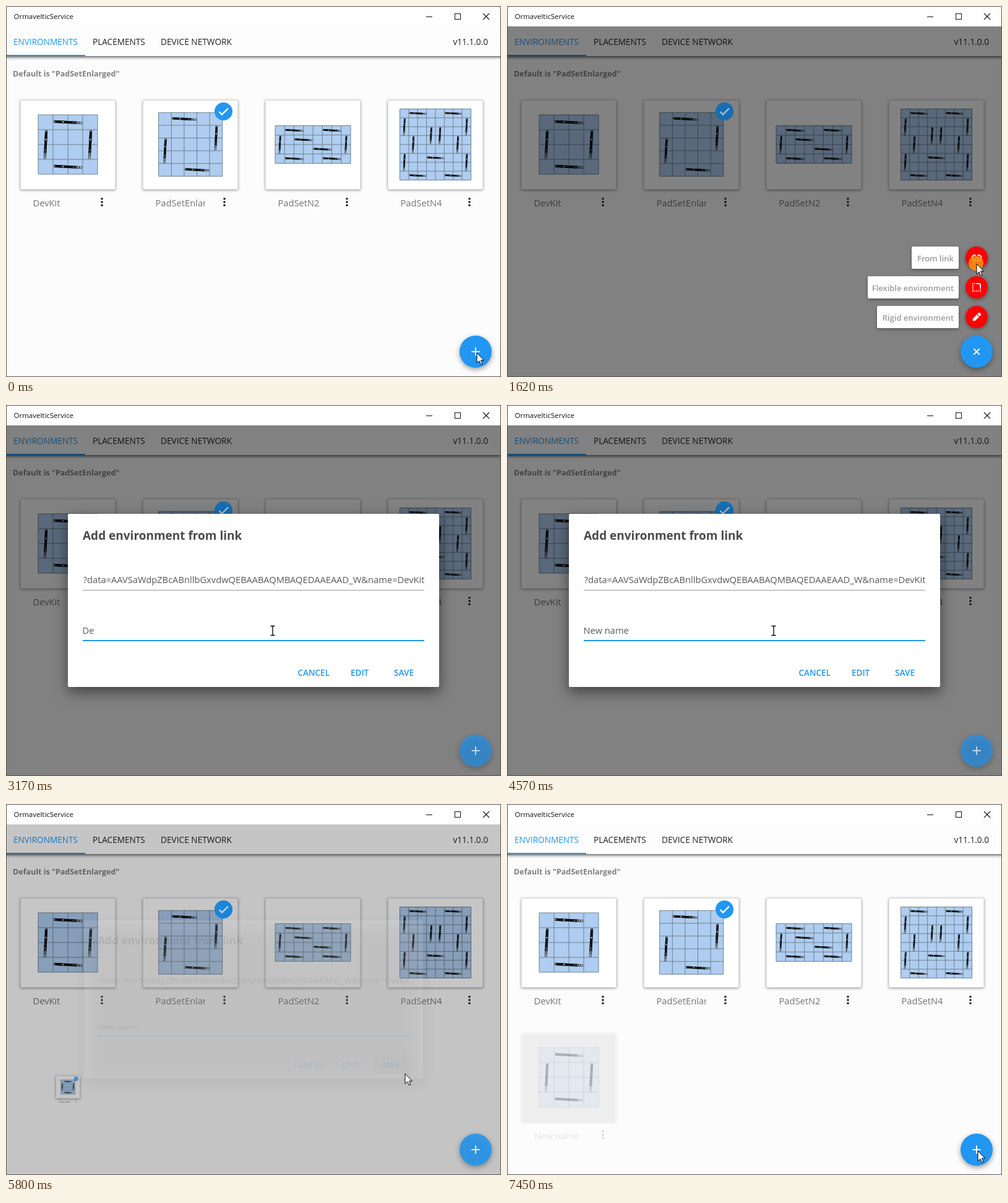
An HTML page with a canvas that plays this animation: 800x600 px, repeating every 7.52 s.

```html
<!DOCTYPE html>
<html lang="en">
<head>
<meta charset="utf-8">
<title>Environment manager</title>
<style>
  html, body { margin: 0; width: 100%; height: 100%; overflow: hidden; background: #fcfcfc; }
  canvas { display: block; width: 100vw; height: 100vh; }
</style>
</head>
<body>
<canvas id="stage" width="800" height="600"></canvas>
<script>
const ctx = document.getElementById('stage').getContext('2d');
const LOOP = 7520, TICK = 70, FONT = '"Open Sans", "Noto Sans", sans-serif';
const BLUE = '#2196f3';
let t = 0;

const clamp = v => Math.max(0, Math.min(1, v));
const during = (a, b) => t >= a && t < b;
const easeInOut = p => p < 0.5 ? 2 * p * p : 1 - 2 * (1 - p) * (1 - p);
const mix = (a, b, p) => a + (b - a) * p;

function ramp(a, b) {
  return t < a ? 0 : clamp((Math.floor((t - a) / TICK) + 1) * TICK / (b - a + TICK));
}

function group(alpha, cx, cy, scale, draw) {
  if (alpha <= 0 || scale <= 0) return;
  ctx.save();
  ctx.globalAlpha *= alpha;
  ctx.translate(cx, cy);
  ctx.scale(scale, scale);
  ctx.translate(-cx, -cy);
  draw();
  ctx.restore();
}

function text(str, x, y, size, color, weight = 400, align = 'left') {
  ctx.font = `${weight} ${size}px ${FONT}`;
  ctx.fillStyle = color;
  ctx.textAlign = align;
  ctx.fillText(str, x, y);
}

function box(x, y, w, h, color) {
  ctx.fillStyle = color;
  ctx.fillRect(x, y, w, h);
}

function disc(x, y, r, color) {
  ctx.fillStyle = color;
  ctx.beginPath();
  ctx.arc(x, y, r, 0, 7);
  ctx.fill();
}

function lines(points, width, color) {
  ctx.lineWidth = width;
  ctx.strokeStyle = color;
  ctx.beginPath();
  for (let i = 0; i < points.length; i += 4) {
    ctx.moveTo(points[i], points[i + 1]);
    ctx.lineTo(points[i + 2], points[i + 3]);
  }
  ctx.stroke();
}

function shadowed(blur, dy, alpha, draw) {
  ctx.save();
  ctx.shadowColor = `rgba(0,0,0,${alpha})`;
  ctx.shadowBlur = blur;
  ctx.shadowOffsetY = dy;
  draw();
  ctx.restore();
}

function panel(x, y, w, h, r) {
  ctx.fillStyle = '#fff';
  ctx.beginPath();
  ctx.roundRect(x, y, w, h, r);
  ctx.fill();
}

// Floor plans: flat and upright bars as column, row pairs of their centres.
const KIT = { x: 52, y: 176, cell: 24, cols: 4, rows: 4,
  flat: [2, .5, 2, 3.5], up: [.5, 2, 3.5, 2] };
const PLANS = [
  { name: 'DevKit', ...KIT },
  { name: 'PadSetEnlarged', x: 246.7, y: 172.3, cell: 20.6, cols: 5, rows: 5,
    flat: [2, .5, 3, 4.5], up: [4.5, 2, .5, 3] },
  { name: 'PadSetN2', x: 435, y: 193.5, cell: 15.25, cols: 8, rows: 4,
    flat: [2, .5, 6, .5, 3, 1.5, 5, 2.5, 2, 3.5, 6, 3.5], up: [.5, 2, 7.5, 2] },
  { name: 'PadSetN4', x: 636.5, y: 166.5, cell: 14.37, cols: 8, rows: 8,
    flat: [2, .5, 6, .5, 4, 5.5, 2, 7.5, 6, 7.5],
    up: [.5, 2, 7.5, 2, 3.5, 3, 4.5, 3, 1.5, 4, 6.5, 4, .5, 6, 7.5, 6] }
];

function bar(x, y, cell, upright) {
  const len = cell * 1.92, thick = Math.max(2.6, cell * 0.17);
  ctx.save();
  ctx.translate(x, y);
  ctx.rotate((upright ? 93 : 3) * Math.PI / 180);
  box(-len / 2, -thick / 2, len, thick, '#4a5057');
  box(-len * .47, -thick / 2, len * .78, thick, '#0d0f11');
  for (const p of [-.46, -.17, .2, .3, .37, .45])
    disc(len * p, 0, thick * (p === -.17 || p > .4 ? .27 : .19), '#e8eef4');
  ctx.restore();
}

function plan({ x, y, cell, cols, rows, flat, up }) {
  const w = cell * cols, h = cell * rows, grid = [];
  box(x, y, w, h, '#aecdf0');
  for (let c = 0; c <= cols; c++) grid.push(x + c * cell, y, x + c * cell, y + h);
  for (let r = 0; r <= rows; r++) grid.push(x, y + r * cell, x + w, y + r * cell);
  lines(grid, 1, '#71808f');
  for (let i = 0; i < flat.length; i += 2) bar(x + flat[i] * cell, y + flat[i + 1] * cell, cell, false);
  for (let i = 0; i < up.length; i += 2) bar(x + up[i] * cell, y + up[i + 1] * cell, cell, true);
}

function card(x, y, item, name) {
  shadowed(4, 1, .42, () => panel(x, y, 154, 145, 2));
  ctx.lineWidth = 1;
  ctx.strokeStyle = 'rgba(0,0,0,.12)';
  ctx.strokeRect(x + .5, y + .5, 153, 144);
  plan(item);
  ctx.save();
  ctx.beginPath();
  ctx.rect(x + 18, y + 150, 83, 36);
  ctx.clip();
  text(name, x + 20.5, y + 172, 14.7, '#757575');
  ctx.restore();
  for (const dy of [159.7, 165, 170.3]) disc(x + 132, y + dy, 1.8, '#212121');
}

function badge(x, y) {
  disc(x, y, 14.5, BLUE);
  ctx.lineWidth = 2.4;
  ctx.strokeStyle = '#fff';
  ctx.beginPath();
  ctx.moveTo(x - 7, y + .5);
  ctx.lineTo(x - 2.5, y + 5);
  ctx.lineTo(x + 7.5, y - 5);
  ctx.stroke();
}

function titleBar() {
  box(0, 0, 800, 33, '#fff');
  text('OrmavelticService', 12.5, 21, 11.5, '#111');
  box(679, 17, 10, 1, '#111');
  ctx.lineWidth = 1;
  ctx.strokeStyle = '#111';
  ctx.strokeRect(725.5, 12.5, 9, 9);
  lines([771, 12, 781, 22, 781, 12, 771, 22], 1.1, '#111');
}

function page() {
  box(0, 0, 800, 600, '#fcfcfc');
  shadowed(5, 1.5, .75, () => box(-10, 33, 820, 48, '#fdfdfd'));
  text('ENVIRONMENTS', 12, 63, 13.6, BLUE);
  text('PLACEMENTS', 140, 63, 13.6, '#212121');
  text('DEVICE NETWORK', 250, 63, 13.7, '#212121');
  text('v11.1.0.0', 779, 63, 13.6, '#212121', 400, 'right');
  box(1, 79, 127, 2, BLUE);
  text('Default is "PadSetEnlarged"', 11, 114, 12.5, '#808080', 700);
  PLANS.forEach((p, i) => card(23 + 198 * i, 152, p, p.name));
  badge(351.5, 170.5);

  const grow = [0, .25, .72, 1][Math.max(0, Math.min(3, Math.floor((t - 5730) / TICK)))];
  const shown = clamp((LOOP - t) / 420);
  group(shown, 100, 463, grow, () => {
    card(23, 370, { ...KIT, y: 394 }, 'New name');
    if (grow < 1) group(1 - grow, 0, 0, 1, () => badge(153, 388));
  });
}

function fab(turn) {
  shadowed(9, 3, .38, () => disc(759, 559, 26, BLUE));
  ctx.save();
  ctx.translate(759, 559);
  ctx.rotate(turn * Math.PI / 4);
  lines([-6.7, 0, 6.7, 0, 0, -6.7, 0, 6.7], 2, '#fff');
  ctx.restore();
}

function linkIcon() {
  ctx.lineWidth = 1.8;
  ctx.strokeStyle = '#fff';
  ctx.beginPath();
  ctx.moveTo(-1.5, -4);
  ctx.lineTo(-3.5, -4);
  ctx.arc(-3.5, 0, 4, -Math.PI / 2, Math.PI / 2, true);
  ctx.lineTo(-1.5, 4);
  ctx.moveTo(1.5, -4);
  ctx.lineTo(3.5, -4);
  ctx.arc(3.5, 0, 4, -Math.PI / 2, Math.PI / 2);
  ctx.lineTo(1.5, 4);
  ctx.moveTo(-3, 0);
  ctx.lineTo(3, 0);
  ctx.stroke();
}

function cornerIcon() {
  for (let i = 0; i < 5; i++) {
    const p = -7 + i * 3;
    box(-7, p, 1.7, 1.7, '#fff');
    box(p, 5.3, 1.7, 1.7, '#fff');
  }
  box(5.3, 2, 1.7, 1.7, '#fff');
  box(-4, -7, 1.7, 1.7, '#fff');
  ctx.lineWidth = 1.8;
  ctx.strokeStyle = '#fff';
  ctx.beginPath();
  ctx.moveTo(-1, -6.1);
  ctx.lineTo(3, -6.1);
  ctx.arc(3, -3, 3.1, -Math.PI / 2, 0);
  ctx.lineTo(6.1, 1);
  ctx.stroke();
}

function pencilIcon() {
  ctx.rotate(-Math.PI / 4);
  ctx.fillStyle = '#fff';
  ctx.beginPath();
  ctx.moveTo(-9, 0);
  ctx.lineTo(-6, -2.5);
  ctx.lineTo(3, -2.5);
  ctx.lineTo(3, 2.5);
  ctx.lineTo(-6, 2.5);
  ctx.fill();
  box(4.2, -2.5, 4, 5, '#fff');
}

const ACTIONS = [
  { y: 407, left: 654, label: 'From link', icon: linkIcon },
  { y: 455, left: 583, label: 'Flexible environment', icon: cornerIcon },
  { y: 503, left: 598, label: 'Rigid environment', icon: pencilIcon }
];

function menu() {
  ACTIONS.forEach(({ y, left, label, icon }, i) => {
    const start = 400 + (2 - i) * TICK, p = ramp(start, start + 140);
    group(p, 759, y, p, () => {
      shadowed(6, 2, .4, () => disc(759, y, 18, '#f00'));
      ctx.save();
      ctx.translate(759, y);
      icon();
      ctx.restore();
    });
    group(p, 730, y, mix(.8, 1, p), () => {
      shadowed(5, 2, .35, () => panel(left, y - 18, 730 - left, 36, 2));
      text(label, 722, y + 6, 13, '#9a9a9a', 600, 'right');
    });
  });
}

const EDITS = [
  [0, 'DevKit'], [2840, 'DevKi'], [2940, 'DevK'], [3040, 'Dev'], [3140, 'De'], [3240, ''],
  [3540, 'N'], [3770, 'Ne'], [3970, 'New'], [4170, 'New '], [4270, 'New n'],
  [4370, 'New na'], [4470, 'New nam'], [4570, 'New name']
];

function underline(y, focus) {
  box(124, y, 552, 1, '#9a9a9a');
  box(400 - 276 * focus, y - 1, 552 * focus, 2, BLUE);
}

function dialog() {
  shadowed(22, 8, .5, () => panel(100, 176, 600, 280, 2));
  text('Add environment from link', 124, 218, 19, '#4a4a4a', 700);
  ctx.save();
  ctx.beginPath();
  ctx.rect(124, 265, 553, 34);
  ctx.clip();
  text('?data=AAVSaWdpZBcABnllbGxvdwQEBAABAQMBAQEDAAEAAD_W&name=DevKit',
    676.5, 288, 14.7, '#5a5a5a', 400, 'right');
  ctx.restore();
  const swap = ramp(2440, 2640);
  underline(299, ramp(1890, 2100) * (1 - swap));
  underline(381, swap);
  text(EDITS.findLast(e => t >= e[0])[1], 123.5, 370, 14.7, '#5a5a5a');
  if (t >= 5320) box(613, 415, 62, 33, 'rgba(0,0,0,.1)');
  text('CANCEL', 471.5, 438, 13.5, BLUE, 600);
  text('EDIT', 557, 438, 13.5, BLUE, 600);
  text('SAVE', 627, 438, 13.7, BLUE, 600);
}

const MOVES = [
  [460, 1090, 759, 417], [1890, 2370, 431, 365], [4770, 5460, 645, 436], [6470, 7170, 761, 561]
];

function pointer() {
  let x = 761, y = 561;
  for (const [a, b, toX, toY] of MOVES) {
    const p = easeInOut(ramp(a, b));
    x = mix(x, toX, p);
    y = mix(y, toY, p);
  }
  if ([[330, 460], [1620, 1750], [2440, 2540], [5590, 5660]].some(c => during(...c)))
    disc(x - 1, y - 1, 12, 'rgba(255,145,20,.88)');
  ctx.save();
  ctx.translate(x, y);
  if (during(1890, 5590) && x < 676 && y < 382) {
    lines([0, -7, 0, 7, -3.5, -7.5, 3.5, -7.5, -3.5, 7.5, 3.5, 7.5], 1.3, '#000');
  } else {
    ctx.beginPath();
    for (const [px, py] of [[0, 0], [0, 16.5], [3.8, 13], [6.5, 18.8], [9, 17.7], [6.4, 12], [11.5, 12]])
      ctx.lineTo(px, py);
    ctx.closePath();
    ctx.fillStyle = '#fff';
    ctx.fill();
    ctx.lineWidth = 1;
    ctx.strokeStyle = '#000';
    ctx.stroke();
  }
  ctx.restore();
}

function draw() {
  const closing = clamp(Math.floor((t - 5590) / TICK) * TICK / 350);
  const dim = ramp(330, 600) * (1 - closing ** 1.2);
  const leave = clamp(closing * 350 / 240);
  const open = t >= 1820 ? 1 : t >= 1750 ? .6 : 0;

  page();
  box(0, 33, 800, 567, `rgba(0,0,0,${.49 * dim})`);
  if (dim > 0) group(.45, 0, 0, 1, () => badge(351.5, 170.5));
  titleBar();
  group(1 - (t >= 1750 ? .32 * dim : 0), 0, 0, 1, () => fab(during(330, 1750) ? ramp(330, 540) : 0));
  if (during(330, 1750)) menu();
  if (open) group(open * (1 - leave), 400, 316, mix(.9, 1, open) - .1 * leave, dialog);
  ctx.lineWidth = 1;
  ctx.strokeStyle = '#555';
  ctx.strokeRect(.5, .5, 799, 599);
  pointer();
}

function loop() {
  t = performance.now() % LOOP;
  draw();
  requestAnimationFrame(loop);
}
loop();
</script>
</body>
</html>
```
